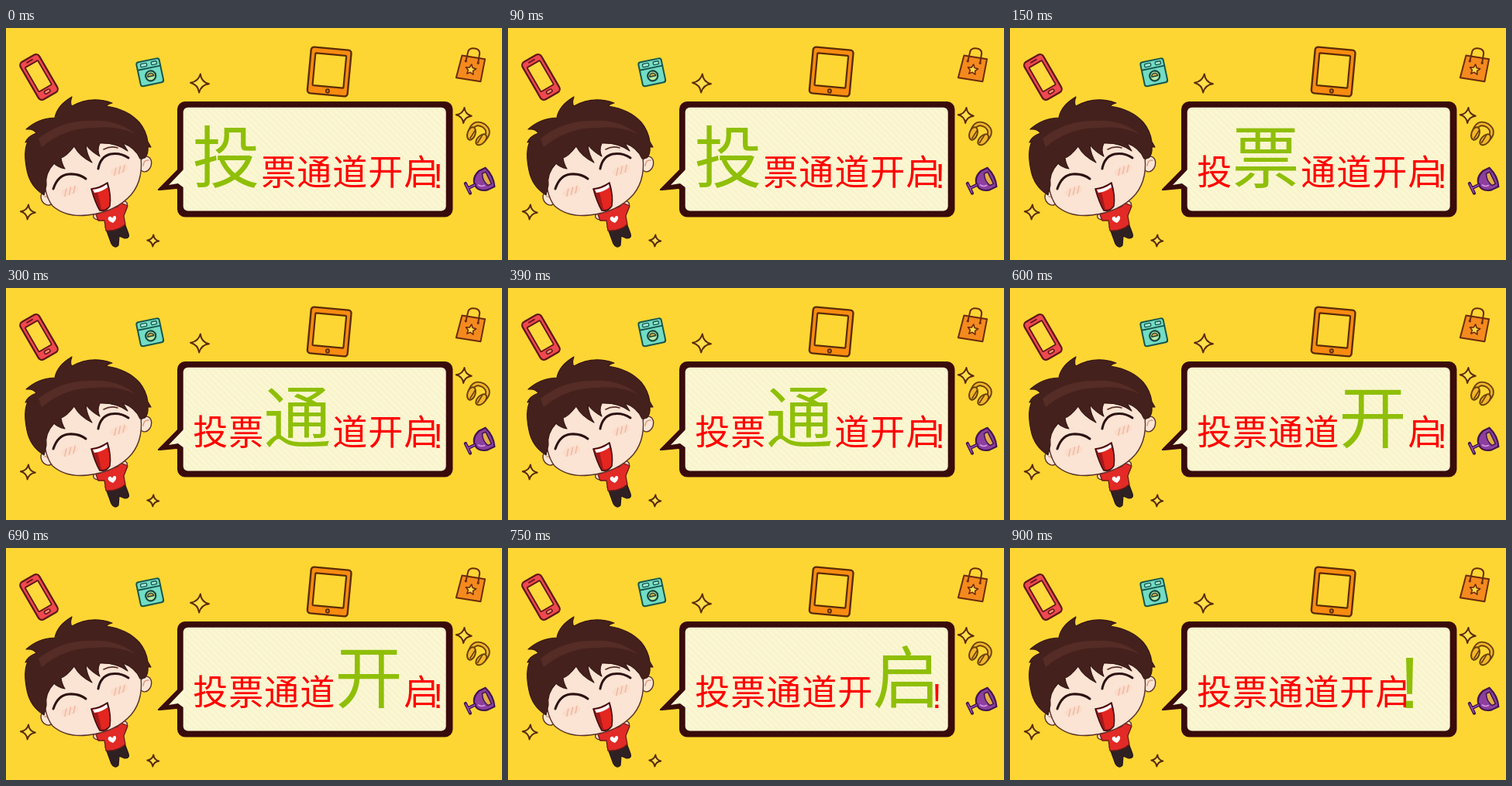
Recreate the animation shown at these times as an HTML page with a canvas. Size 640 px wide and 300 px high, loop 1.05 s.

```html
<!DOCTYPE html>
<html lang="zh-CN">
<head>
<meta charset="utf-8">
<title>投票通道开启</title>
<style>
html, body { margin: 0; width: 100%; height: 100%; overflow: hidden; background: #fed633; }
canvas { display: block; }
</style>
</head>
<body>
<canvas id="stage" width="640" height="300"></canvas>
<script>
const ctx = document.getElementById('stage').getContext('2d');
const STEP = 150, INK = '#5a2f28', GOLD = '#fed633';
const CHARS = [...'投票通道开启!'];

function paint(path, fill, line, width) {
  if (fill) { ctx.fillStyle = fill; ctx.fill(path); }
  if (line) { ctx.strokeStyle = line; ctx.lineWidth = width; ctx.stroke(path); }
}

function shape(d, fill, line, width = 2) {
  paint(new Path2D(d), fill, line, width);
}

function oval(x, y, rx, ry, turn, fill, line, width = 2) {
  const p = new Path2D();
  p.ellipse(x, y, rx, ry, turn, 0, Math.PI * 2);
  paint(p, fill, line, width);
}

function box(x, y, w, h, r, fill, line, width = 2) {
  const p = new Path2D();
  p.roundRect(x, y, w, h, r);
  paint(p, fill, line, width);
}

function at(x, y, degrees, draw) {
  ctx.save();
  ctx.translate(x, y);
  ctx.rotate(degrees * Math.PI / 180);
  draw();
  ctx.restore();
}

function sparkle(x, y, r) {
  at(x, y, 4, () => {
    const q = r * 0.16;
    shape(`M0 ${-r}Q${q} ${-q} ${r} 0Q${q} ${q} 0 ${r}Q${-q} ${q} ${-r} 0Q${-q} ${-q} 0 ${-r}Z`, '#ffdf4a', '#5a2c0c', 2);
  });
}

function star(r) {
  let d = '';
  for (let i = 0; i < 10; i++) {
    const a = i * Math.PI / 5 - Math.PI / 2, k = i % 2 ? r * 0.48 : r;
    d += (i ? 'L' : 'M') + Math.cos(a) * k + ' ' + Math.sin(a) * k;
  }
  shape(d + 'Z', '#ffd94a', '#6b2c0c', 1.6);
}

function gadgets() {
  at(42.5, 63.5, -30, () => {
    box(-14, -28, 28, 56, 5, '#f0484f', '#5f1718', 2.2);
    box(-9.5, -19.5, 19, 36, 1, '#ffd83c', '#5f1718', 1.8);
    shape('M-4 -24H4', null, '#5f1718', 1.8);
    box(-4, 19.5, 8, 4, 2, '#f88a70', '#5f1718', 1.5);
  });
  at(185.8, 57.5, -12, () => {
    box(-15, -16, 30, 31.5, 3, '#72dcc4', '#17564c', 2);
    shape('M-15 -6H15', null, '#17564c', 1.8);
    box(-10, -13, 8, 4, 1, '#a5eed8', '#17564c', 1.4);
    box(4, -13, 7, 4, 1, '#a5eed8', '#17564c', 1.4);
    oval(0, 4.5, 6.5, 6.5, 0, '#b9e9a4', '#17463f', 2.2);
    shape('M-4 5A4 4 0 0 1 4 5Z', '#e0a83a', '#17463f', 1.4);
  });
  at(417.2, 56.5, 5.3, () => {
    box(-26, -30, 52, 60, 4, '#f98b10', '#5a2c08', 2.4);
    box(-20, -22.5, 40, 42, 1, GOLD, '#5a2c08', 2.2);
    oval(0, 25, 2.2, 2.4, 0, '#c96a10', '#5a2c08', 1.6);
  });
  at(600, 52, 9, () => {
    shape('M-14 -14.5H16L15 15L-17 15Z', '#f48a1e', '#6b2c0c', 2);
    shape('M-8 -8L-7 -21Q-6 -26 1 -26Q7 -26 8 -21V-8', null, '#6b2c0c', 2);
    oval(-8, -8, 1.6, 1.6, 0, '#6b2c0c');
    oval(8, -8, 1.6, 1.6, 0, '#6b2c0c');
    at(0, 2, 0, () => star(7));
  });
  at(609, 137, 32, () => {
    shape('M-10 3Q-14 -12 0 -13Q14 -12 10 3', null, '#69400b', 6.5);
    shape('M-10 3Q-14 -12 0 -13Q14 -12 10 3', null, '#f3b52b', 2.8);
    for (const x of [-7.5, 7.5]) {
      oval(x, 4, 5, 8.5, x * 0.03, '#f3b52b', '#69400b', 2);
      shape(`M${x - x * 0.25} -2V10`, null, '#69400b', 1.6);
    }
  });
  at(613, 199, 64, () => {
    shape('M-14 -13Q0 -18 13 -13L13 -3Q10 9 1 9Q-10 9 -14 -4Z', '#8d3f9e', '#40154f', 2.2);
    shape('M-9 -11H8L8 -6Q0 -2 -9 -6Z', '#e3ad45', '#40154f', 1.5);
    shape('M0 9V18M-7 19H7', null, '#40154f', 4.2);
    shape('M0 9V18M-6 19H6', null, '#9c52bb', 1.5);
    shape('M6 -2Q6 3 2 5', null, '#d99be8', 1.6);
  });
  sparkle(250, 71.5, 12);
  sparkle(590.8, 113, 10);
  sparkle(28.3, 238, 9.5);
  sparkle(189.8, 275, 7.5);
}

function bubble() {
  const dark = '#390b0b', cream = '#fbf7d3';
  shape('M227 177L196 208.5Q195 210.5 199 210L220 208L228 214Z', dark);
  box(221, 95, 355.5, 149.5, 10, dark);
  box(228.7, 102.7, 339, 133.8, 6, cream);
  ctx.save();
  ctx.beginPath();
  ctx.rect(230, 104, 337, 131);
  ctx.clip();
  for (let x = 90; x < 570; x += 8) shape(`M${x} 104l132 132`, null, '#f8f3cb', 2);
  ctx.restore();
  shape('M230 182L210 203L222 201L230 207Z', cream);
}

function body() {
  shape('M128 257L136 279Q140 286 145 281L146 269L153 272Q160 272 158 266L152 250Z', '#2f2123', '#241517', 1.2);
  shape('M121 238Q111 239 113 245Q116 250 126 246Z', '#fbdcc4', INK, 1.3);
  shape('M147 232Q148 223 154 224Q159 227 154 237Z', '#fbdcc4', INK, 1.3);
  shape('M116 241L129 236L144 231L148 226L157 230L152 243L154 254Q144 263 129 262L127 249L119 249Z', '#e22a26', '#6a1a18', 1.3);
  shape('M138 252Q130 249 132 245Q135 242 137 246Q139 241 142 244Q143 248 138 252Z', '#fff');
}

function head() {
  const skin = '#fbe4d4';
  oval(180, 176, 7.5, 10, 0.3, skin, INK, 1.4);
  shape('M177 178Q178 170 184 171', null, '#d99b7d', 1.5);
  oval(53, 220, 7.5, 9.5, -0.5, skin, INK, 1.4);
  shape('M50 218Q55 217 57 225', null, '#d99b7d', 1.5);
  shape('M48 178Q48 215 60 230Q77 245 105 242Q142 238 162 215Q179 194 173 160L150 135L80 140Z', skin, INK, 1.4);
  // hair outside, then the fringe from right to left
  shape('M49 216Q31 205 27 184Q22 160 28 147L25 148Q28 140 39 136Q36 130 26 131Q41 117 63 116Q66 100 85 89Q82 97 85 101Q110 87 137 97Q132 98 129 101Q157 105 172 122Q181 133 183 147L187 154L183 154Q184 163 179 168L173 169Q167 155 151 149L157 159Q142 148 121 149Q117 158 121 166Q110 160 103 151Q104 164 111 174Q95 166 88 153Q78 166 71 168Q72 176 76 182Q67 180 62 175Q50 188 52 203Z', '#45211d', '#351614', 1.2);
  shape('M42 143Q72 119 110 120Q143 118 167 137Q143 126 116 129Q77 128 46 154Z', '#552c26');

  shape('M61 208Q67 190 81 189Q94 188 103 195', null, '#2d1212', 3);
  shape('M119 182Q122 166 135 163Q148 161 158 168', null, '#2d1212', 3);
  shape('M126 157Q135 152 144 155', null, INK, 1.6);
  for (const [x, y] of [[82, 211], [146, 184]]) {
    at(x, y, -20, () => {
      oval(0, 0, 12, 5.5, 0, '#fbdccb');
      shape('M-8 4L-3 -4M-2 4L3 -4M4 4L9 -4', null, '#eeb49d', 1.3);
    });
  }
  shape('M110 208Q121 207 131 200Q136 217 134 230Q129 238 121 236Q115 226 110 208Z', '#a3191b', '#421010', 1.6);
  shape('M118 212L131 206Q135 218 133 230Q128 236 123 234Z', '#e3261f');
  shape('M112 209Q122 208 130 202L131 206Q123 212 114 213Z', '#fff');
}

function words(big) {
  let x = 242;
  CHARS.forEach((ch, i) => {
    const on = i === big, size = on ? 87 : 45;
    ctx.fillStyle = on ? '#8fbf08' : '#ff0000';
    if (ch === '!') {
      ctx.font = `${on ? 94 : 44}px "Liberation Sans", sans-serif`;
      ctx.textAlign = 'center';
      ctx.fillText(ch, x + 3, 206.5);
    } else {
      ctx.font = `${size}px "Noto Sans CJK SC", "Noto Sans CJK", sans-serif`;
      ctx.textAlign = 'left';
      ctx.fillText(ch, x - size / 60, on ? 199.5 : 202.5);
    }
    x += ch === '启' ? size * 0.9 : on ? 88 : 46;
  });
}

function draw(big) {
  ctx.lineJoin = ctx.lineCap = 'round';
  ctx.fillStyle = GOLD;
  ctx.fillRect(0, 0, 640, 300);
  gadgets();
  bubble();
  body();
  head();
  words(big);
}

const start = performance.now();
function tick() {
  draw(Math.floor((performance.now() - start) / STEP) % CHARS.length);
  requestAnimationFrame(tick);
}
tick();
</script>
</body>
</html>
```
